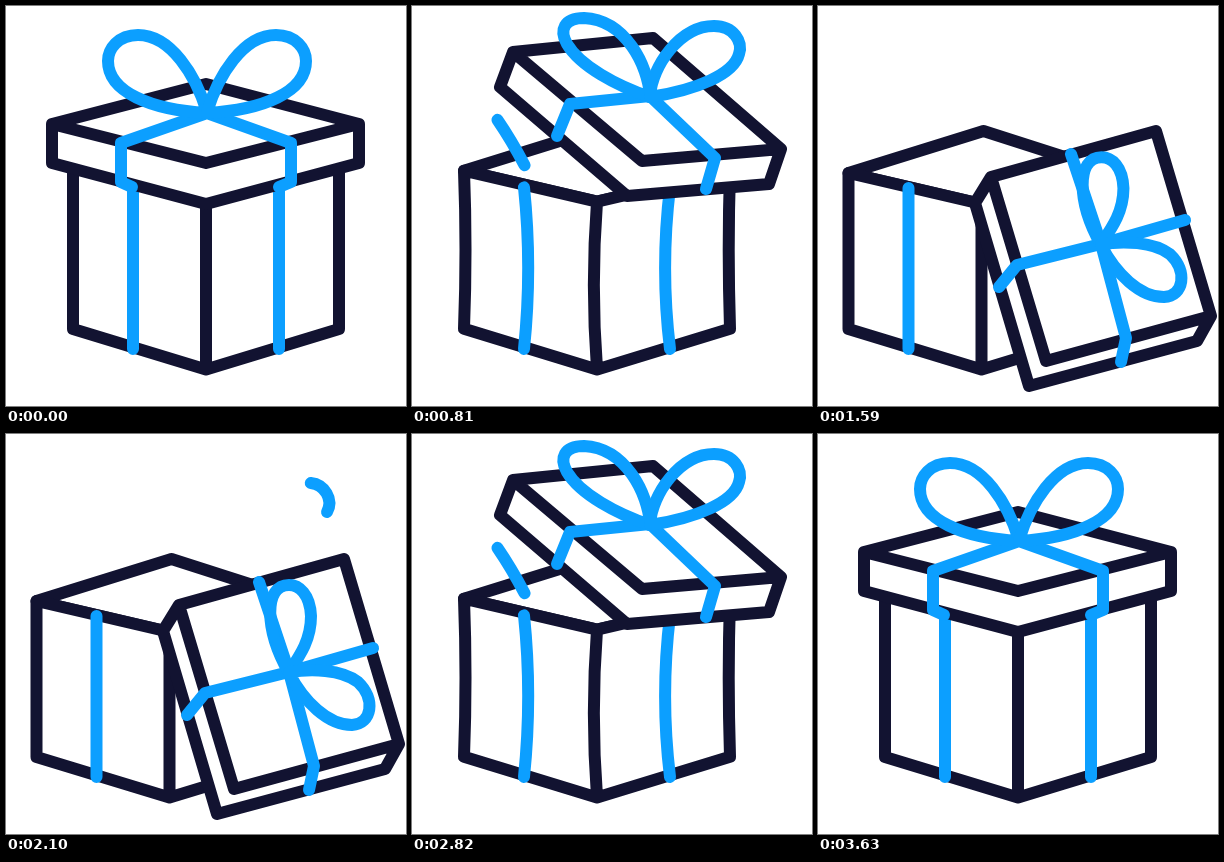
These frames come from a looping animation (400x400 px, 3.66 s). An HTML page:

```html
<!DOCTYPE html>
<html lang="en">
<head>
<meta charset="utf-8">
<title>Gift box</title>
<style>
  html, body { margin: 0; width: 100%; height: 100%; overflow: hidden; background: #fff; }
  svg { display: block; width: 100%; height: 100%; }
  path { fill: none; stroke-width: 12; stroke-linecap: round; stroke-linejoin: round; }
  .ink { stroke: #121331; }
  .blue { stroke: #0c9fff; }
  .solid { fill: #fff; }
</style>
</head>
<body>
<svg viewBox="0 0 400 400">
  <g class="box"><path id="rim" class="ink solid"/></g>
  <path id="streak" class="blue" pathLength="1" d="M128,190 C106,145 80,91 8,28"/>
  <path id="swirl" class="blue" pathLength="1"
    d="M143,150 C147,65 190,10 265,10 C318,10 354,42 354,75 C354,100 335,112 312,110 C285,107 270,90 274,72 C278,55 292,48 304,49 C318,50 328,65 321,78"/>
  <path id="star" class="blue"/>
  <g class="box">
    <path id="front" class="ink solid"/>
    <path id="bands" class="blue"/>
  </g>
  <g id="cover">
    <path id="lid" class="ink solid"/>
    <path id="ribbon" class="blue"/>
    <path id="left" class="blue"/>
    <path id="right" class="blue"/>
  </g>
</svg>
<script>
const LOOP = 3660, STEP = 30, TURN = LOOP - STEP;
const $ = id => document.getElementById(id);

const ease = {
  lin: k => k,
  soft: k => (1 - Math.cos(Math.PI * k)) / 2,
  in: k => k * k,
  out: k => 1 - (1 - k) * (1 - k)
};

// Blend two numbers, or two paths with the same commands.
function mix(a, b, k) {
  if (typeof a === 'number') return a + (b - a) * k;
  const to = b.match(/-?[\d.]+/g);
  let i = 0;
  return a.replace(/-?[\d.]+/g, n => (+n + (to[i++] - n) * k).toFixed(2));
}

// Keys are [time, value, easing towards this key].
function at(keys, t) {
  const i = keys.findIndex(key => key[0] > t);
  if (i === 0) return keys[0][1];
  if (i < 0) return keys[keys.length - 1][1];
  const [t0, a] = keys[i - 1], [t1, b, e = 'soft'] = keys[i];
  return mix(a, b, ease[e]((t - t0) / (t1 - t0)));
}

// Poses: closed, squashed, airborne, leaning.
const poses = {
  lid: [
    'M46,118 L200,78 L353,118 L353,157 L200,198 L46,157 Z M353,118 L200,157 L46,118',
    'M46,130 L200,91 L353,130 L353,167 L200,205 L46,167 Z M353,130 L200,166 L46,130',
    'M101,46 L241,32 L369,143 L357,178 L215,190 L88,81 Z M369,143 L230,155 L101,46',
    'M171,159 L336,113 L391,298 L377,323 L209,368 L155,185 Z M391,298 L226,343 L171,159'
  ],
  ribbon: [
    'M126,181 L115,176 L115,137 L201,107 L285,137 L285,176 L273,181 M201,107 L201,107 M201,107 L201,107',
    'M126,189 L115,185 L115,149 L201,121 L285,149 L285,185 L273,189 M201,121 L201,121 M201,121 L201,121',
    'M145,130 L145,130 L158,98 L238,90 L303,152 L294,183 L294,183 M238,90 L238,90 M238,90 L238,90',
    'M179,269 L179,269 L197,247 L281,226 L306,320 L301,344 L301,344 M281,226 L251,136 M281,226 L365,202'
  ],
  left: [
    'M201,106 C190,70 165,29 132,29 C112,29 102,43 102,55 C102,86 145,104 201,107',
    'M201,120 C188,85 163,50 130,50 C108,50 98,60 98,73 C98,100 150,118 201,121',
    'M238,90 C236,60 214,14 172,12 C152,12 147,24 155,38 C168,60 205,80 238,91',
    'M281,226 C303,219 328,202 335,188 C344,172 338,155 319,154 C296,154 281,190 281,227'
  ],
  right: [
    'M201,106 C212,70 237,29 270,29 C290,29 300,43 300,55 C300,86 257,104 201,107',
    'M201,120 C214,85 239,50 272,50 C294,50 304,60 304,73 C304,100 252,118 201,121',
    'M238,90 C240,60 268,20 302,20 C322,20 331,36 327,48 C322,68 285,84 238,91',
    'M281,226 C310,229 342,236 354,254 C364,272 357,287 344,287 C318,287 292,258 281,227'
  ]
};
const swung = {
  left: 'M281,226 C293,208 303,193 303,170 C302,148 291,139 281,139 C256,139 256,183 281,227',
  right: 'M281,226 C303,223 333,223 350,236 C368,253 364,278 344,279 C320,279 296,256 281,227'
};

const tracks = {};
for (const [id, [closed, squashed, airborne, leaning]] of Object.entries(poses)) {
  tracks[id] = [[0, closed], [330, squashed], [540, closed, 'in'], [810, airborne, 'out'], [945, leaning, 'lin']];
  if (swung[id]) tracks[id].push([1170, leaning], [1530, swung[id]], [1800, mix(swung[id], leaning, 0.12)]);
}

const lidX = [[1170, 0], [1470, 2]];
const lidY = [[540, 0], [700, -7], [810, 0], [945, 11, 'in'], [1150, 0, 'out'],
              [1300, 12.5, 'in'], [1380, 10.5], [1470, 12]];
const slide = [[690, 0], [810, -15, 'in'], [945, -36.5, 'lin']];
const wallBulge = [[0, 0], [330, 1], [520, 0, 'in'], [640, -0.2], [810, -0.08], [960, 0]];
const midBulge = [[0, 0], [330, 1], [520, 0, 'in'], [640, -0.4], [810, -0.35], [960, 0]];
const rimY = [[540, 162], [810, 165.5], [945, 167]];
const streak = {
  head: [[720, 0], [810, 0.43, 'in'], [930, 1, 'out']],
  tail: [[760, 0], [810, 0.17, 'in'], [1170, 0.955, 'out'], [1215, 1]]
};
const swirl = {
  head: [[870, 0], [1170, 0.675, 'lin'], [1410, 1, 'out']],
  tail: [[1080, 0], [1170, 0.078, 'in'], [1530, 0.927, 'lin'], [1590, 1, 'lin']]
};
const burst = {
  head: [[990, 8], [1170, 38, 'out'], [1230, 40]],
  tail: [[1050, 8], [1170, 28, 'lin'], [1260, 40, 'out']]
};

function trim(id, { head, tail }, t) {
  const from = at(tail, t), len = at(head, t) - from, el = $(id);
  el.style.display = len > 0.002 ? '' : 'none';
  el.style.strokeDasharray = `${len} 2`;
  el.style.strokeDashoffset = -from;
}

function drawBox(t) {
  const wall = at(wallBulge, t), b = at(midBulge, t);
  const y = at(rimY, t) + 10 * wall, mid = y + 31;
  const foot = 323 + 2 * wall, half = (y + foot) / 2;
  const bend = (x, y0, y1, d) => `M${x},${y0} Q${x + 2 * d * b},${(y0 + y1) / 2} ${x},${y1}`;
  document.querySelectorAll('.box').forEach(g => g.setAttribute('transform', `translate(${at(slide, t)},0)`));
  $('rim').setAttribute('d', `M67,${y} L202,${y - 42} L333,${y} L200,${mid} Z`);
  $('front').setAttribute('d',
    `M67,${y} Q${67 - 38 * wall},${half} 67,${foot} L200,363.5 L333,${foot} Q${333 + 32 * wall},${half} 333,${y} L200,${mid} Z` +
    bend(200, mid, 363, 9));
  $('bands').setAttribute('d',
    bend(127, 182 + 8 * wall, 343 + wall, -12) + bend(273, 182 + 8 * wall, 343 + wall, 14));
}

function drawStar(t) {
  const r0 = at(burst.tail, t), r1 = at(burst.head, t);
  const ray = (x, y) => `M${102 + x * r0},${54 + y * r0} L${102 + x * r1},${54 + y * r1}`;
  $('star').setAttribute('d', r1 > r0 ? ray(0, -1) + ray(1, 0) + ray(0, 1) + ray(-1, 0) : '');
}

function draw(time) {
  const now = Math.floor(time % LOOP / STEP) * STEP;
  const t = Math.min(now, TURN - now); // the second half plays backwards
  drawBox(t);
  for (const id in tracks) $(id).setAttribute('d', at(tracks[id], t));
  $('cover').setAttribute('transform', `translate(${at(lidX, t)},${at(lidY, t)})`);
  trim('streak', streak, t);
  trim('swirl', swirl, t);
  drawStar(t);
}

const start = performance.now();
function frame() {
  draw(performance.now() - start);
  requestAnimationFrame(frame);
}
frame();
</script>
</body>
</html>
```
